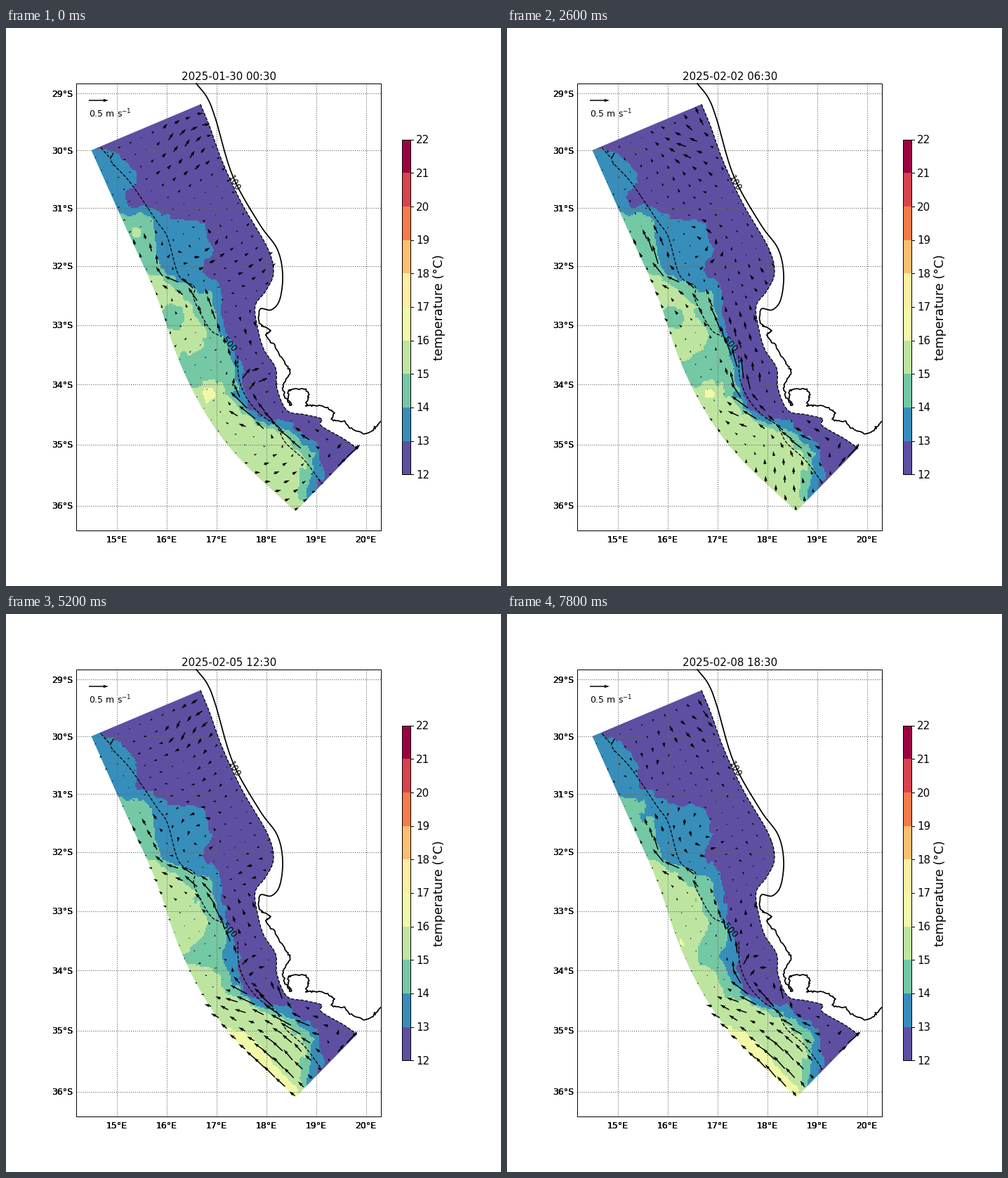
Recreate the animation shown at these times as a matplotlib script. Size 705x794 px, loop 8 s.

```python
import numpy as np
import matplotlib.pyplot as plt
from matplotlib.animation import FuncAnimation
from matplotlib.patches import Polygon, Rectangle
from matplotlib.path import Path

W, H, DPI = 705, 794, 90
FRAMES, STEP_MS = 40, 200


def curve(points, n=8):
    """Smooth path through a few key points (Catmull-Rom)."""
    p = np.array(points, float)
    p = np.vstack([2 * p[0] - p[1], p, 2 * p[-1] - p[-2]])
    t = np.linspace(0, 1, n, endpoint=False)[:, None]
    parts = [b + .5 * t * (c - a) + t**2 * (a - 2.5 * b + 2 * c - .5 * d)
             + t**3 * (1.5 * (b - c) + .5 * (d - a))
             for a, b, c, d in zip(p, p[1:], p[2:], p[3:])]
    return np.vstack(parts + [p[-2:-1]])


def ease(t):
    t = np.clip(t, 0, 1)
    return t * t * (3 - 2 * t)


def bell(x, y, cx, cy, r):
    return np.exp(-((x - cx) ** 2 + (y - cy) ** 2) / (2 * r * r))


def ripple(x, y, i, seed, short, long, drift=.06):
    """Smooth seeded field, roughly within -1..1, drifting slowly."""
    rng = np.random.default_rng(seed)
    total = 0
    for wave in np.geomspace(short, long, 6):
        a, p, d = rng.uniform(0, 2 * np.pi), rng.uniform(0, 7), rng.normal()
        k = 2 * np.pi / wave
        total = total + np.sin(k * (x * np.cos(a) + y * np.sin(a))
                               + p + d * drift * i)
    return total / 3


# Geography in stage pixels, y down
WEST = curve([(121.5, 174), (167, 276), (213, 378), (245, 470), (282, 545),
              (330, 610), (412, 688)])
EAST = curve([(277, 108.5), (290, 140), (308, 190), (336, 250), (372, 312),
              (381, 348), (370, 374), (355, 395), (358, 425), (367, 457),
              (384, 484), (386, 513), (400, 544), (425, 550), (449, 556),
              (449, 566), (480, 584), (500, 598)])
COAST = curve([(271, 79), (287, 100), (299, 131), (323, 211), (361, 279),
               (386, 314), (394, 350), (390, 386), (378, 401), (362, 400),
               (361, 420), (376, 430), (371, 438), (386, 458), (398, 478),
               (404, 490), (394, 508), (397, 524), (405, 537), (402, 522),
               (405, 515), (425, 514), (431, 524), (428, 537), (446, 538),
               (466, 546), (465, 557), (483, 561), (492, 571), (513, 577),
               (526, 568), (534, 560)])
rough = np.random.default_rng(4).normal(0, .8, COAST.shape)
COAST += rough * (COAST[:, 1:] > 405)
SHELF = curve([(135, 170), (148, 184), (153, 178), (150, 190), (177, 220),
               (214, 274), (230, 298), (246, 352), (268, 368), (268, 387),
               (290, 428), (307, 439)])
SHELF_SOUTH = curve([(330, 466), (332, 500), (345, 530), (365, 552),
                     (385, 566), (398, 590), (425, 615), (449, 647)])
DOMAIN = np.vstack([EAST, WEST[::-1]])

# Mean isotherms, north to south
ISO13 = [(118, 165), (156, 176), (188, 215), (190, 250), (230, 266),
         (284, 278), (296, 310), (278, 345), (305, 368), (312, 430),
         (338, 485), (326, 522), (350, 545), (395, 560), (445, 590),
         (452, 625), (438, 680)]
ISO14 = [(60, 250), (195, 266), (214, 290), (217, 345), (290, 380),
         (305, 440), (326, 490), (324, 525), (345, 550), (410, 578),
         (438, 605), (426, 680)]
ISO15 = [(60, 255), (100, 300), (160, 335), (232, 360), (272, 400),
         (285, 450), (268, 490), (305, 515), (335, 548), (400, 582),
         (424, 610), (414, 680)]

# Warm and cold patches: x, y, radius, strength at the start and the end
PATCHES = [(290, 517, 10, 1.3, .3), (230, 412, 14, -.9, -.1),
           (262, 492, 17, -.9, 0), (318, 488, 14, .2, -.7),
           (325, 522, 13, .4, -.7), (250, 468, 8, -.2, .9),
           (186, 290, 11, .9, -.2), (180, 240, 8, -.5, .1)]

GX, GY = np.meshgrid(np.arange(101, 521, 2), np.arange(101, 701, 2))
EDGE_X = np.interp(GY, WEST[:, 1], WEST[:, 0])


def temperature(i):
    x = GX + 4 * ripple(GX, GY, i, 1, 13, 70)
    y = GY + 4 * ripple(GX, GY, i, 2, 13, 70)
    x13, x14, x15 = (np.interp(y, *np.array(iso).T[::-1])
                     for iso in (ISO13, ISO14, ISO15))
    t = 13 - .9 * np.tanh((x - x13) / 30)
    t = np.where(x < x13, 13 + (x13 - x) / (x13 - x14), t)
    t = np.where(x < x14, 14 + (x14 - x) / (x14 - x15), t)
    t = np.where(x < x15, 15.5 - .5 * np.exp(np.minimum(x - x15, 0) / 40), t)
    for cx, cy, r, start, end in PATCHES:
        amp = start + (end - start) * ease(i / 38)
        t = t + amp * bell(x, y, cx, cy, r)
    # Warm water spreads along the south-west edge
    warm = np.exp(-((x - EDGE_X) / 30) ** 2) / (1 + np.exp((588 - y) / 5))
    return t + (.45 + .85 * ease((i - 13) / 13)) * warm


def arrow_grid():
    seg = np.hypot(*np.diff(WEST, axis=0).T)
    dist = np.r_[0, np.cumsum(seg)]
    pts = []
    for s in np.arange(dist[-1] - 2, 0, -19.5):
        px, py = (np.interp(s, dist, WEST[:, k]) for k in (0, 1))
        a = np.radians(-22.8 - 22.8 * s / dist[-1])
        d = 1.5 + 17.5 * np.arange(16)
        pts.append(np.c_[px + d * np.cos(a), py + d * np.sin(a)])
    pts = np.vstack(pts)
    return pts[Path(DOMAIN).contains_points(pts)].T


AX, AY = arrow_grid()
JET = curve([(425, 595), (365, 556), (335, 520), (320, 465), (290, 405),
             (262, 372), (225, 350), (210, 300)])
gaps = np.hypot(AX[:, None] - JET[:, 0], AY[:, None] - JET[:, 1])
near = gaps.argmin(axis=1)
along = np.gradient(JET, axis=0)
along = (along / np.hypot(*along.T)[:, None])[near]
jet_core = np.exp(-(gaps.min(axis=1) / 13) ** 2)


def push(cx, cy, r, size, deg):
    """Local flow of a given size and compass-plane angle."""
    a = np.radians(deg)
    w = size * bell(AX, AY, cx, cy, r)
    return np.array([w * np.cos(a), -w * np.sin(a)])


def currents(i):
    # Daily turning motion, strongest on the northern shelf
    spin = np.radians(28 + 90 * i + 25 * ripple(AX, AY, i, 5, 90, 220))
    size = 2 + 8 * bell(AX, AY, 262, 155, 45) + 4 * bell(AX, AY, 345, 330, 35)
    size = size * (1 + .5 * ripple(AX, AY, i, 6, 50, 150))
    flow = np.array([size * np.cos(spin), -size * np.sin(spin)])
    flow += [1.8 * ripple(AX, AY, i, s, 50, 140) for s in (7, 8)]

    # Shelf-edge jet with slow pulses
    flow += along.T * jet_core * (19 + 7 * np.sin(near / 5 - .2 * i))
    # Anticlockwise eddy
    flow += np.array([AY - 308, 278 - AX]) * .45 * bell(AX, AY, 278, 308, 22)

    flow += push(482, 613, 13, 25, 42)
    flow += push(185, 315, 14, 9, 124)
    flow += push(238, 405, 26, 6, 120)
    flow += push(340, 553, 15, 16, 165)
    flow += push(348, 502, 13, 19, 15 + 75 * np.exp(-((i - 11) / 6) ** 2))
    flow += push(345, 430, 28, 9 * (2 * ease(i / 6) - 1), 95)
    # The south turns north-west and strengthens
    flow += push(388, 645, 36, 8 + 19 * ease((i - 8) / 24),
                 10 + 120 * ease(i / 22))
    flow += push(312, 580, 27, 4 + 11 * ease((i - 15) / 20), 152)
    flow += push(392, 545, 15, 18 * ease((i - 15) / 12), 105)
    flow += push(440, 585, 22, 8, 155)
    return flow


def stamp(i):
    hours = 6 * i
    day = 29 + hours // 24
    return f"2025-{1 + day // 31:02}-{day % 31 + 1:02} {hours % 24:02}:30"


plt.rcParams["font.family"] = "DejaVu Sans"
fig = plt.figure(figsize=(W / DPI, H / DPI), dpi=DPI, facecolor="white")
ax = fig.add_axes([0, 0, 1, 1])
ax.set_axis_off()


def label(x, y, s, size=10, ha="center", passes=1):
    """Text with digits centred on y; more passes give firmer strokes."""
    for _ in range(passes):
        text = ax.text(x, y + .365 * size * DPI / 72, s, fontsize=size, ha=ha,
                       va="baseline")
    return text


def mercator_y(lat):
    m = [np.log(np.tan(np.radians(45 + a / 2))) for a in (lat, 29)]
    return 93 + 4045 * (m[0] - m[1])


cmap = plt.get_cmap("Spectral_r", 10)
sea = ax.imshow(temperature(0), cmap=cmap, vmin=12, vmax=22,
                extent=(100, 520, 700, 100), interpolation="nearest",
                aspect="auto", zorder=1)
sea.set_clip_path(Polygon(DOMAIN, transform=ax.transData))

TOP, BOTTOM = .1 * H, .9 * H
LEFT, RIGHT = 100.4, 533.9
grid = dict(color="0.4", ls=":", lw=.9, zorder=2)
for k in range(6):
    x = 158 + 70.9 * k
    ax.plot([x, x], [TOP, BOTTOM], **grid)
    label(x, 727.5, f"{15 + k}°E", passes=3)
for lat in range(29, 37):
    y = mercator_y(lat)
    ax.plot([LEFT, RIGHT], [y, y], **grid)
    label(95, y, f"{lat}°S", ha="right", passes=3)

for line in (EAST, SHELF, SHELF_SOUTH):
    ax.plot(*line.T, color="k", ls="--", lw=1, zorder=3)
ax.plot(*COAST.T, color="k", lw=1.4, zorder=3)
for x, y, s, turn in ((325, 221, "100", -61), (317.5, 450, "500", -47)):
    ax.text(x, y, s, fontsize=10, rotation=turn, ha="center", va="center",
            zorder=3)

shaft = dict(angles="xy", scale_units="xy", scale=1, units="dots", width=1.5,
             color="k", zorder=4)
arrows = ax.quiver(AX, AY, *currents(0), **shaft)
ax.quiver([118], [103], [28], [0], **shaft)
label(118, 122.5, "0.5 m s$^{-1}$", ha="left")
ax.add_patch(Rectangle((LEFT, TOP), RIGHT - LEFT, BOTTOM - TOP, fill=False,
                       lw=.8, zorder=5))

# Colour bar: three quarters of the map's height
bar_h = .75 * (BOTTOM - TOP)
bar_w, bar_x, base = bar_h / 40, 563.9, H / 2 + bar_h / 2
cell = bar_h / 10
for k in range(11):
    y = base - cell * k
    if k < 10:
        ax.add_patch(Rectangle((bar_x, y - cell), bar_w, cell, fc=cmap(k),
                               lw=0))
    ax.plot([bar_x + bar_w, bar_x + bar_w + 4.4], [y, y], color="k", lw=.8)
    label(584, y, str(12 + k), 12, "left")
ax.add_patch(Rectangle((bar_x, base - bar_h), bar_w, bar_h, fill=False, lw=.8,
                       zorder=5))
ax.text(616.5, 398, "temperature (°C)", fontsize=14, rotation=90,
        ha="center", va="center")
title = label(317.5, 68.5, stamp(0), 12)
ax.set_xlim(0, W)
ax.set_ylim(H, 0)


def update(i):
    sea.set_data(temperature(i))
    arrows.set_UVC(*currents(i))
    title.set_text(stamp(i))
    return sea, arrows, title


anim = FuncAnimation(fig, update, frames=FRAMES, interval=STEP_MS,
                     repeat=True, repeat_delay=0, blit=False)
plt.show()
```
